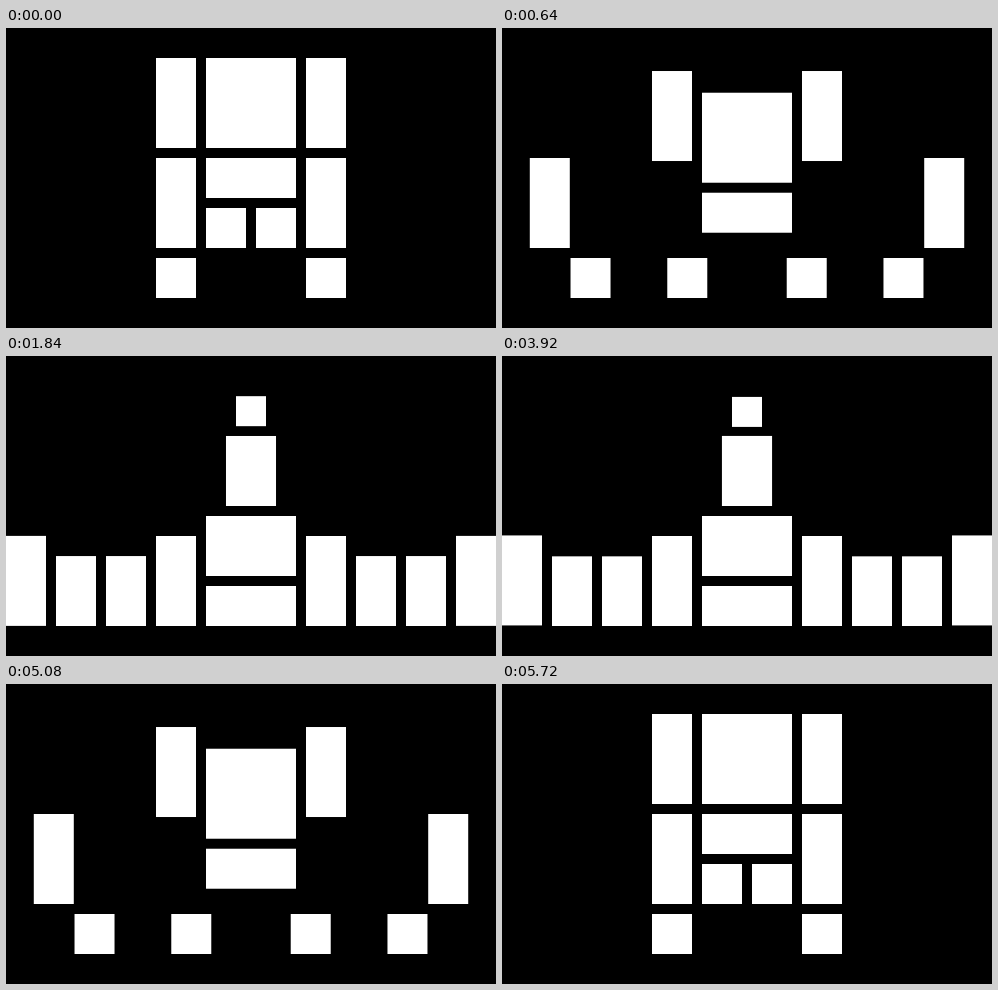
Write an HTML page with a canvas that moves like this. It is 490 px wide and 300 px high and loops after 7.68 s.

```html
<!DOCTYPE html>
<html lang="en">
<head>
<meta charset="utf-8">
<title>Blocks</title>
<style>
  html, body { margin: 0; height: 100%; overflow: hidden; background: #000; }
  canvas { display: block; }
</style>
</head>
<body>
<canvas id="stage" width="490" height="300"></canvas>
<script>
const ctx = document.getElementById('stage').getContext('2d');
const STEP = 40, LOOP = 192, MIRROR = 143;

// Quadratic ease in and out between two steps
function ease(step, from, to) {
  const q = Math.min(1, Math.max(0, (step - from) / (to - from)));
  return q < 0.5 ? 2 * q * q : 1 - 2 * (1 - q) * (1 - q);
}

function pair(x, y, w, h) {
  ctx.fillRect(x, y, w, h);
  ctx.fillRect(490 - x - w, y, w, h);
}

// Block centred on the stage, placed by its bottom edge
function centred(bottom, w, h) {
  ctx.fillRect(245 - w / 2, bottom - h, w, h);
}

function draw(step) {
  const spread = ease(step, 0, 23);
  const drop = ease(step, 0, 12);
  const fall = ease(step, 6, 30);
  const shoulder = ease(step, 11, 35);
  const squash = ease(step, 16, 40);
  const rise = ease(step, 23, 46.8);
  const narrow = ease(step, -1, 47);

  ctx.fillStyle = '#000';
  ctx.fillRect(0, 0, 490, 300);
  ctx.fillStyle = '#fff';

  pair(150, 30 + 150 * shoulder, 40, 90);
  pair(150 - 150 * spread, 130 + 50 * rise, 40, 90);

  const grow = 30 * rise;
  pair(150 - 100 * spread, 230 - grow, 40, 40 + grow);
  pair(200 - 100 * fall, 180 + 50 * drop - grow, 40, 40 + grow);

  centred(170 + 100 * fall, 90, 40);
  centred(120 + 100 * fall, 90, 90 - 30 * squash);

  const towerBase = 120 + Math.min(30, 100 * fall);
  centred(towerBase, 90 - 40 * narrow, 90 - 20 * narrow);
  centred(towerBase - 80 * rise, 30, 30);
}

function frame() {
  const step = Math.floor(performance.now() / STEP) % LOOP;
  draw(Math.min(step, MIRROR - step));
  requestAnimationFrame(frame);
}
frame();
</script>
</body>
</html>
```
